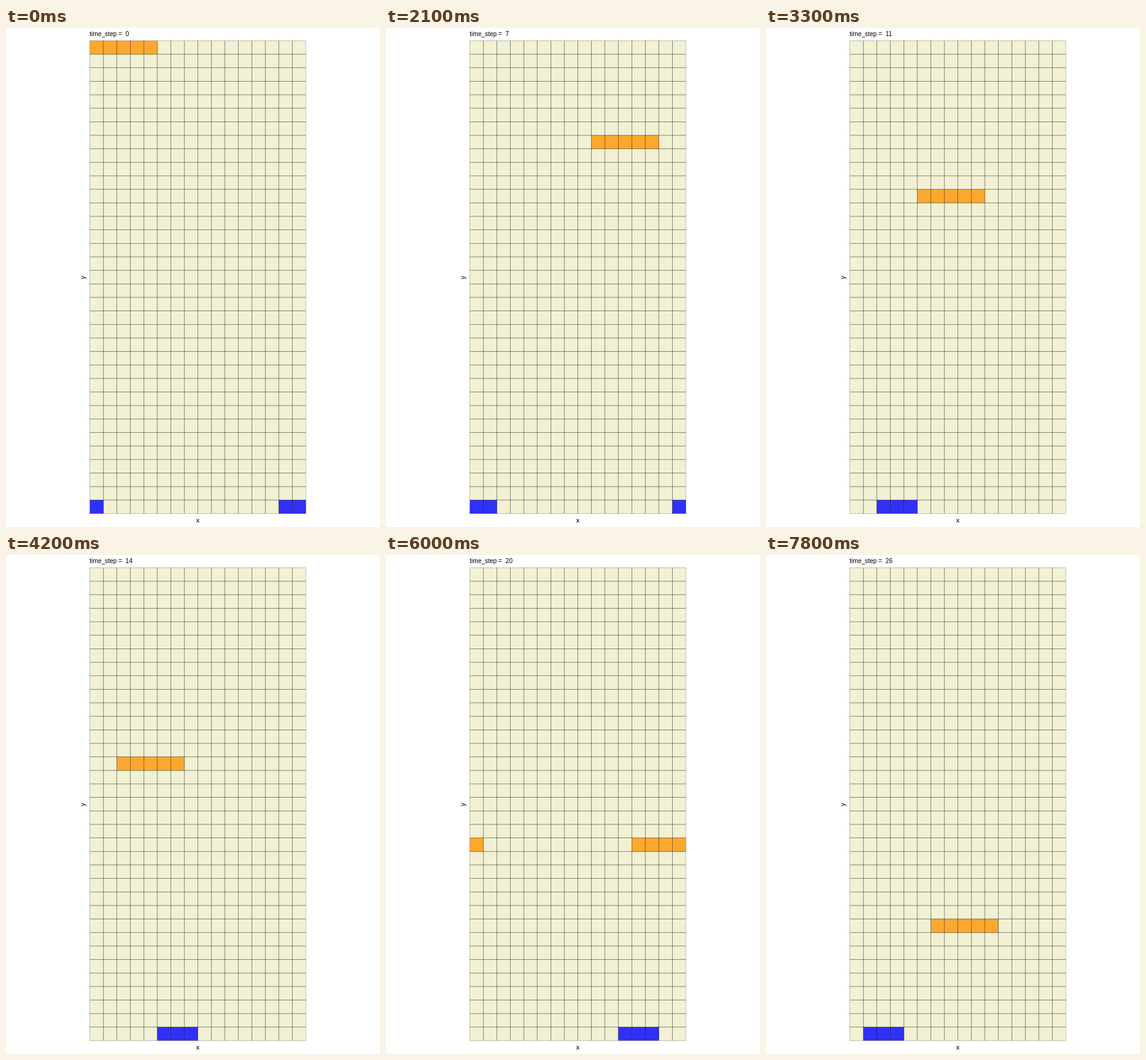
Recreate the animation shown at these times as an HTML page with a canvas. Size 600x800 px, loop 8 s.

```html
<!DOCTYPE html>
<html lang="en">
<head>
<meta charset="utf-8">
<title>Grid steps</title>
<style>
html, body { margin: 0; width: 100%; height: 100%; overflow: hidden; background: #fff; }
canvas { display: block; }
</style>
</head>
<body>
<canvas id="stage" width="600" height="800"></canvas>
<script>
const ctx = document.getElementById('stage').getContext('2d');
const COLS = 16, ROWS = 35, CELL = 21.66, X0 = 134.5, Y0 = 20.4;
const W = COLS * CELL, H = ROWS * CELL;
const STEP = 300, LOOP = 8000;
const FONT = '"Liberation Sans", Arial, sans-serif';

const wrap = n => ((n % COLS) + COLS) % COLS;

// A horizontal run of cells that wraps around the sides.
function drawRun(left, row, length, color) {
  ctx.fillStyle = color;
  for (let i = 0; i < length; i++) {
    ctx.fillRect(X0 + wrap(left + i) * CELL, Y0 + row * CELL, CELL + 0.1, CELL);
  }
}

function drawLine(x, y, w, h, outer) {
  ctx.fillStyle = outer ? 'rgba(0,0,0,.3)' : 'rgba(0,0,0,.6)';
  ctx.fillRect(x, y, w, h);
}

function drawGrid() {
  const t = 0.75;
  for (let c = 0; c <= COLS; c++) {
    drawLine(X0 + c * CELL - t / 2, Y0, t, H, c % COLS === 0);
  }
  for (let r = 0; r <= ROWS; r++) {
    drawLine(X0, Y0 + r * CELL - t / 2, W, t, r % ROWS === 0);
  }
}

function drawText(text, x, y, size, align, angle = 0) {
  ctx.save();
  ctx.translate(x, y);
  ctx.rotate(angle);
  ctx.font = size + 'px ' + FONT;
  ctx.textAlign = align;
  ctx.fillStyle = '#000';
  ctx.fillText(text, 0, 0);
  ctx.restore();
}

// The paddle waits near the right edge, then runs right every step.
const paddleLeft = s => s < 9 ? 14 + (s > 6) : s - 9;

function draw(step) {
  ctx.fillStyle = '#fff';
  ctx.fillRect(0, 0, 600, 800);
  ctx.fillStyle = '#f2f1d3';
  ctx.fillRect(X0, Y0, W, H);
  drawRun(-step, step, 5, '#fca82f');
  drawRun(paddleLeft(step), ROWS - 1, 3, '#3030f8');
  drawGrid();
  drawText('time_step =  ' + step, 134.3, 13, 10, 'left');
  drawText('x', X0 + W / 2, 793, 11, 'center');
  drawText('y', 126.8, Y0 + H / 2 + 0.5, 11, 'center', -Math.PI / 2);
}

const start = performance.now();
function tick() {
  draw(Math.floor(((performance.now() - start) % LOOP) / STEP));
  requestAnimationFrame(tick);
}
tick();
</script>
</body>
</html>
```
